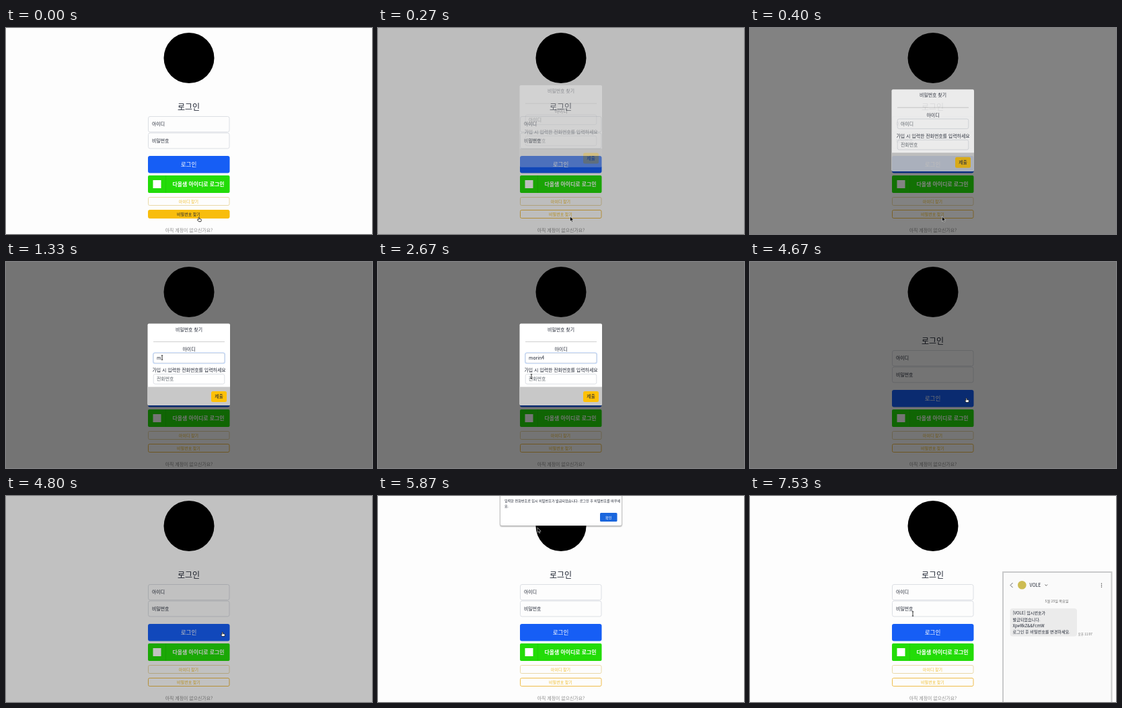
An HTML page for the animation above (7590 ms loop, 544 px wide and 306 px high).

```html
<!DOCTYPE html>
<html lang="ko">
<head>
<meta charset="utf-8">
<style>
  html, body { margin: 0; width: 100%; height: 100%; overflow: hidden; background: #fdfdfd; }
  svg { display: block; width: 544px; height: 306px; }
  text { font: 500 6.9px "Noto Sans CJK KR", "Noto Sans CJK", "Noto Sans", sans-serif; dominant-baseline: central; fill: #1f2533; white-space: pre; }
  .mid { text-anchor: middle; }
  .light { font-weight: 400; }
  .small { font-size: 6px; }
  .tiny { font-size: 5.1px; }
  .field, .input { fill: #fdfdfd; stroke: #d9dce1; stroke-width: .9; }
  .input { fill: #fff; }
  .outline { fill: #fdfdfd; stroke: #efbd4a; }
  .pale { stroke: #ead9a8; }
  .gold { fill: #f0bd2c; }
  .white { fill: #fff; }
  .hint { fill: #5c636a; }
  .line { fill: none; stroke: #555; stroke-width: .9; }
</style>
</head>
<body>
<svg viewBox="0 0 544 306">
  <rect width="544" height="306" fill="#fdfdfd"/>
  <circle cx="272" cy="44.5" r="37.5"/>

  <text class="mid light" x="271.5" y="116.5" style="font-size:12px">로그인</text>
  <rect class="field" x="211.5" y="131.5" width="120.5" height="23" rx="2.5"/>
  <rect class="field" x="211.5" y="156" width="120.5" height="23" rx="2.5"/>
  <text x="217" y="142">아이디</text>
  <text x="217" y="167">비밀번호</text>
  <rect x="211" y="190" width="121.5" height="25.5" rx="3" fill="#165ef5"/>
  <text class="mid light white" x="271.5" y="202" style="font-size:8.6px">로그인</text>
  <rect x="211" y="219" width="121.5" height="26" rx="2" fill="#23dc08"/>
  <path d="M237.5 219v26" stroke="#20cc08" stroke-width=".8"/>
  <rect class="white" x="218.5" y="226" width="12" height="12"/>
  <text class="white" x="247.5" y="231.5" style="font-size:7.9px;font-weight:700">다올샘 아이디로 로그인</text>
  <rect class="outline pale" x="211.5" y="251.5" width="120.5" height="12" rx="2"/>
  <text class="mid small gold" x="271.5" y="257">아이디 찾기</text>
  <rect id="find" class="outline" x="211.5" y="270.5" width="120.5" height="12" rx="2"/>
  <text id="findText" class="mid small" x="271.5" y="276">비밀번호 찾기</text>
  <text class="mid light" x="272" y="299.5" style="fill:#8c8c8c">아직 계정이 없으신가요?</text>

  <rect id="shade" width="544" height="306"/>

  <g id="modal">
    <rect class="white" x="210.5" y="91.5" width="122.5" height="121.5" rx="2"/>
    <path d="M210.5 185.5H333V211a2 2 0 0 1-2 2H212.5a2 2 0 0 1-2-2z" fill="#c8c8c8"/>
    <text class="mid" x="272" y="99.5">비밀번호 찾기</text>
    <path d="M219 118.5H325" stroke="#c4c4c4" stroke-width=".8"/>
    <text class="mid" x="272" y="129">아이디</text>
    <rect class="glow" x="218" y="134.2" width="108" height="17" rx="3.5" fill="#b9d3fb"/>
    <rect class="input" x="219.2" y="135.4" width="105.6" height="14.6" rx="2.5"/>
    <text class="value" x="224" y="142"></text>
    <text class="mid" x="272" y="160">가입 시 입력한 전화번호를 입력하세요</text>
    <rect class="glow" x="218" y="165.4" width="108" height="17" rx="3.5" fill="#b9d3fb"/>
    <rect class="input" x="219.2" y="166.6" width="105.6" height="14.6" rx="2.5"/>
    <text class="value" x="224" y="173"></text>
    <rect id="submit" x="305" y="192" width="23" height="16" rx="2.5" fill="#ffc107"/>
    <text class="mid" x="316.5" y="199">제출</text>
    <g id="masked">
      <rect class="white" x="235" y="181" width="74" height="7"/>
      <rect x="240" y="224" width="68.5" height="15" fill="#106504"/>
      <g id="cells"></g>
    </g>
    <rect id="drop" class="white" x="235" y="181" width="74" height="58"/>
  </g>

  <g id="alert">
    <rect x="180.5" y="-6" width="183" height="52.5" rx="4" opacity=".12"/>
    <rect x="181.5" y="-6" width="181" height="51" rx="3" opacity=".25"/>
    <rect class="white" x="182" y="-6" width="180" height="50" rx="2"/>
    <text class="tiny" x="188" y="6">입력한 전화번호로 임시 비밀번호가 발급되었습니다. 로그인 후 비밀번호를 바꾸세</text>
    <text class="tiny" x="188" y="14.5">요.</text>
    <rect x="330" y="25" width="25.5" height="13" rx="1.5" fill="#1a66dd"/>
    <text class="mid tiny white" x="342.7" y="31">확인</text>
  </g>

  <g id="panel">
    <rect x="376" y="113" width="161.5" height="200" fill="#fafafa" stroke="#c9cacb" stroke-width="2"/>
    <path class="line" d="M390.5 129l-3.5 3.5 3.5 3.5M438.5 131.5l1.8 1.8 1.8-1.8"/>
    <circle cx="404.3" cy="132.3" r="6.3" fill="#cdbc52"/>
    <text x="415.5" y="131.8">VOLE</text>
    <path d="M522.5 129.5v1.2m0 1.3v1.2m0 1.3v1.2" stroke="#444" stroke-width="1.2"/>
    <text class="mid tiny" x="456" y="155" style="fill:#666">5월 25일 목요일</text>
    <rect x="386.5" y="167" width="99.5" height="41.5" rx="4" fill="#ebebeb"/>
    <g id="message"></g>
    <text x="487.5" y="204.5" style="font-size:4.6px;fill:#666">오후 11:07</text>
  </g>

  <g id="pointer">
    <path id="arrow" d="M0 0V7.2L1.7 5.7 2.8 8.2 4 7.7 2.9 5.2H5.2Z" stroke="#fff" stroke-width=".5"/>
    <path id="hand" d="M0 .6Q.8-.4 1.5.6V2.6L4 3.1Q4.6 3.3 4.4 4.4L3.7 6.6H.5L-1.6 4.1Q-1.4 3.2-.6 3.6L0 4Z" fill="#fff" stroke="#111" stroke-width=".8"/>
    <path id="beam" d="M-1.2-3.2H1.2M0-3.2V3.2M-1.2 3.2H1.2" stroke="#222" stroke-width=".9"/>
  </g>
</svg>
<script>
const LOOP = 7590;
const $ = id => document.getElementById(id);
const all = name => [...document.querySelectorAll(name)];
const glows = all('.glow'), values = all('.value'), inputs = all('.input');
const ramp = (t, a, b) => Math.min(1, Math.max(0, (t - a) / (b - a)));
const between = (t, a, b) => t >= a && t < b;
const set = (el, attrs) => { for (const k in attrs) el.setAttribute(k, attrs[k]); };
const show = (el, on) => { el.style.display = on ? '' : 'none'; };

// time, x, y, pointer shape
const path = [
  [0, 286, 281, 'hand'], [130, 285.5, 280, 'arrow'], [900, 285.5, 280, 'arrow'],
  [1150, 232, 142, 'beam'], [2340, 232, 142, 'beam'], [2560, 228, 170, 'beam'],
  [3700, 228, 170, 'arrow'], [3850, 262, 230, 'arrow'], [3930, 262, 230, 'arrow'],
  [4100, 321.5, 203, 'hand'], [4330, 321, 202, 'hand'], [5100, 321, 202, 'arrow'],
  [5700, 237, 47, 'arrow'], [6300, 237, 47, 'arrow'], [6800, 342, 31, 'arrow'],
  [7030, 342, 31, 'arrow'], [7430, 242, 175, 'beam'], [LOOP, 242, 175, 'beam']
];
const idTimes = [1330, 1470, 1670, 1870, 2130, 2330];
const phoneTimes = [3530, 3600, 3670];

$('message').innerHTML = [
  '[VOLE] 임시번호가', '발급되었습니다.', 'Xp#RkZ&amp;&amp;FcmW', '로그인 후 비밀번호를 변경하세요.'
].map((s, i) => `<text x="390.5" y="${173.7 + i * 9.35}" style="font-size:6.1px">${s}</text>`).join('');

// x, y, width, height, colour of the censored blocks
$('cells').innerHTML = [
  [239, 169, 6, 6, '#a0a9ba'], [245, 169, 6, 6, '#abb4c6'], [258, 169, 6, 6, '#a8b0c2'],
  [264, 169, 7, 6, '#c3cbdb'], [271, 169, 6, 6, '#596071'], [245, 226, 6, 6, '#2b7822'],
  [258, 226, 13, 6, '#568d4f'], [271, 226, 19, 6, '#3c8035'], [258, 232, 13, 7, '#4a8743'],
  [302, 226, 6, 6, '#447f3d']
].map(([x, y, w, h, c]) => `<rect x="${x}" y="${y}" width="${w}" height="${h}" fill="${c}"/>`).join('');

function typed(el, text, times, t, hint) {
  const n = times.filter(k => t >= k).length;
  el.textContent = n ? text.slice(0, n) : hint;
  el.classList.toggle('hint', !n);
}

function movePointer(t) {
  const i = path.findIndex((p, k) => k + 1 === path.length - 1 || t < path[k + 1][0]);
  const [t0, x0, y0, shape] = path[i], [t1, x1, y1] = path[i + 1];
  const u = ramp(t, t0, t1), e = u * u * (3 - 2 * u);
  set($('pointer'), { transform: `translate(${x0 + (x1 - x0) * e} ${y0 + (y1 - y0) * e})` });
  for (const s of ['arrow', 'hand', 'beam']) show($(s), s === shape);
}

function draw(t) {
  const hover = t < 130;
  set($('find'), { style: hover ? 'fill:#f8bd0c;stroke:#f8bd0c' : '' });
  $('findText').classList.toggle('gold', !hover);

  set($('shade'), { opacity: .54 * Math.min(ramp(t, 130, 430), 1 - ramp(t, 4690, 4890)) });
  const enter = ramp(t, 190, 440), leave = ramp(t, 4400, 4650);
  const lift = 14 * ((1 - enter) ** 2 + leave ** 2);
  set($('modal'), { opacity: Math.min(enter, 1 - leave), transform: `translate(0 ${-lift})` });

  show(glows[0], between(t, 1200, 3270));
  show(glows[1], between(t, 3270, 4400));
  typed(values[0], 'morin4', idTimes, t, '아이디');
  typed(values[1], '010', phoneTimes, t, '전화번호');
  inputs[1].style.fill = t >= 3930 ? '#e8f0fe' : '';
  show($('drop'), between(t, 3670, 3930));
  show($('masked'), between(t, 3930, 4400));
  set($('submit'), { fill: between(t, 4060, 4400) ? '#ffca2c' : '#ffc107' });

  show($('alert'), between(t, 4960, 7000));
  set($('panel'), { opacity: ramp(t, 6300, 6600) });
  movePointer(t);
}

function tick(now) {
  draw(now % LOOP);
  requestAnimationFrame(tick);
}
draw(0);
requestAnimationFrame(tick);
</script>
</body>
</html>
```
